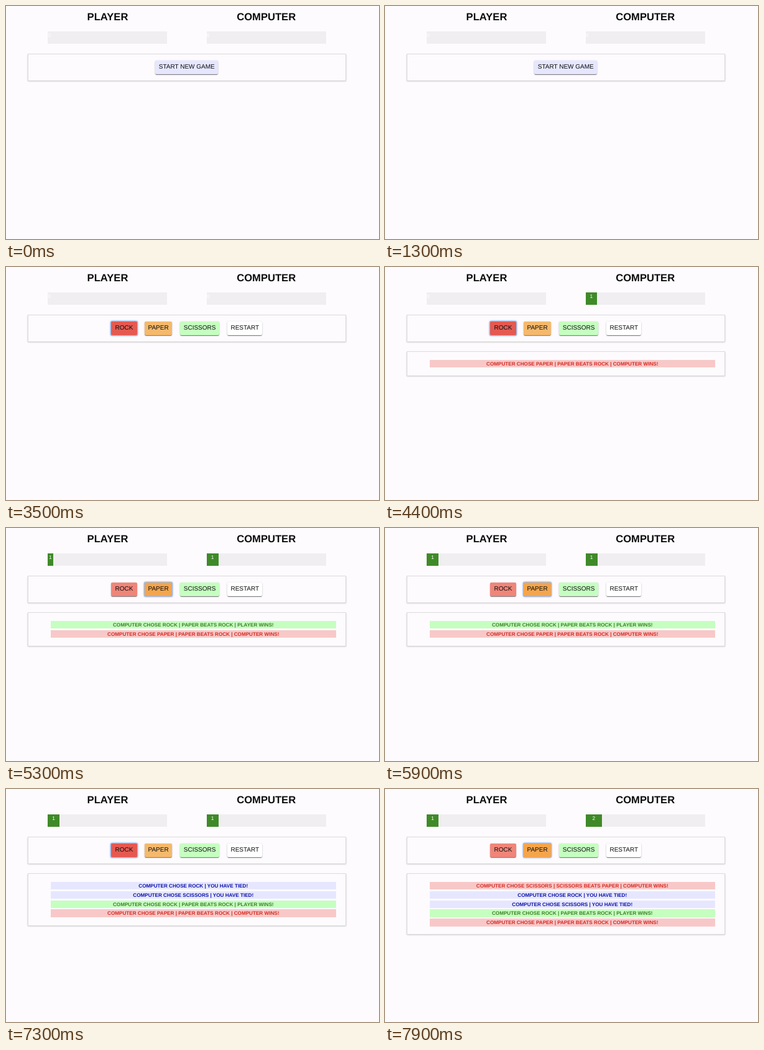
Write an HTML page that moves like this. It is 600 px wide and 376 px high and loops after 8000 ms.

```html
<!DOCTYPE html>
<html lang="en">
<head>
<meta charset="utf-8">
<title>Rock Paper Scissors</title>
<style>
  html, body { margin: 0; width: 100%; height: 100%; overflow: hidden; background: #fdfbfe; }
  * { box-sizing: border-box; }
  .stage {
    position: relative; width: 600px; height: 376px; overflow: hidden;
    font-family: "Liberation Sans", Arial, sans-serif; color: #0c0c0c;
    text-rendering: geometricPrecision;
  }
  .stage > *, .btn { position: absolute; }

  /* everything shares one 8 s clock */
  .a { animation: 8s step-end infinite; }

  h2 { margin: 0; top: 8px; width: 256px; font-size: 16.6px; line-height: 20px; text-align: center; }
  .left { left: 35.5px; }
  .right { left: 290.7px; }

  .bar { top: 41px; width: 192px; height: 20px; background: #f0eef0; }
  .fill { height: 20px; background: #3f8a28; animation: 8s ease infinite; }
  .num { height: 13px; min-width: 5px; overflow: hidden; color: #fff; font-size: 8.3px; line-height: 13px; text-align: center; }
  .num span { display: block; }

  .panel {
    left: 35px; width: 511.5px; background: #fdfbfe; border: .5px solid #dddbde;
    box-shadow: 0 1.3px 1.5px rgba(0,0,0,.18), 0 .6px 3px rgba(0,0,0,.1);
  }
  .btn {
    --rest: 0 1.6px .8px -.8px rgba(0,0,0,.45), 0 1px 1.4px rgba(0,0,0,.22), 0 .5px 2.6px rgba(0,0,0,.15);
    --ring: 0 0 0 1.2px #9dbbea, 0 0 2px 1.6px rgba(130,165,225,.6);
    top: 87.5px; height: 22.5px; border-radius: 2px; background: var(--bg); box-shadow: var(--rest);
    font-size: 10px; line-height: 22.5px; text-align: center; white-space: nowrap;
  }

  .log { top: 136px; padding: 13px 15px 10.5px 36px; animation-name: shown; }
  .row { overflow: hidden; font-size: 8.13px; font-weight: bold; line-height: 13px; text-align: center; white-space: nowrap; }
  .loss { background: #f8c8c8; color: #d42b22; }
  .win { background: #c5ffc0; color: #3c7f24; }
  .tie { background: #e6e7ff; color: #0d14a8; }

  .start { animation-name: start; }
  .choice { animation-name: choice; }
  @keyframes start { 0% { visibility: visible } 28.5%, 100% { visibility: hidden } }
  @keyframes choice { 0% { visibility: hidden } 28.5%, 100% { visibility: visible } }
  @keyframes shown { 0% { visibility: hidden } 44.75%, 100% { visibility: visible } }

  @keyframes rock {
    0%, 62.875%, 95.75%, 100% { background: var(--bg); box-shadow: var(--rest) }
    28.5%, 87.3% { background: var(--hot); box-shadow: var(--ring) }
  }
  @keyframes paper {
    0%, 76.875% { background: var(--bg); box-shadow: var(--rest) }
    62.875%, 95.75%, 100% { background: var(--hot); box-shadow: var(--ring) }
  }
  @keyframes scissors {
    0%, 87.3%, 100% { background: var(--bg); box-shadow: var(--rest) }
    76.875% { background: var(--hot); box-shadow: var(--ring) }
  }

  @keyframes row1 { 0% { height: 0; margin: 0 } 44.75%, 100% { height: 12.4px; margin: 0 0 2.4px } }
  @keyframes row2 { 0% { height: 0; margin: 0 } 62.875%, 100% { height: 12.4px; margin: 0 0 2.4px } }
  @keyframes row3 { 0% { height: 0; margin: 0 } 76.875%, 100% { height: 12.4px; margin: 0 0 2.4px } }
  @keyframes row4 { 0% { height: 0; margin: 0 } 87.3%, 100% { height: 12.4px; margin: 0 0 2.4px } }
  @keyframes row5 { 0% { height: 0; margin: 0 } 95.75%, 100% { height: 12.4px; margin: 0 0 2.4px } }

  /* each point widens a bar by 10% over 1 s; the last growth is cut by the loop */
  @keyframes playerBar { 0%, 62.875% { width: 0 } 75.375%, 100% { width: 10% } }
  @keyframes computerBar {
    0%, 44.75% { width: 0 }
    57.25% { width: 10% }
    95.75% { width: 10%; animation-timing-function: cubic-bezier(.393, .091, .576, .573) }
    100% { width: 15.86% }
  }
  @keyframes playerNum { 0% { transform: none } 62.875%, 100% { transform: translateY(-13px) } }
  @keyframes computerNum {
    0% { transform: none }
    44.75% { transform: translateY(-13px) }
    95.75%, 100% { transform: translateY(-26px) }
  }
</style>
</head>
<body>
<div class="stage">
  <h2 class="left">PLAYER</h2>
  <h2 class="right">COMPUTER</h2>

  <div class="bar" style="left:67px">
    <div class="fill" style="animation-name:playerBar">
      <div class="num"><div class="a" style="animation-name:playerNum"><span>0</span><span>1</span></div></div>
    </div>
  </div>
  <div class="bar" style="left:322.5px">
    <div class="fill" style="animation-name:computerBar">
      <div class="num"><div class="a" style="animation-name:computerNum"><span>0</span><span>1</span><span>2</span></div></div>
    </div>
  </div>

  <div class="panel" style="top:77px;height:43.5px"></div>
  <div class="a start"><div class="btn" style="left:240.2px;width:101.2px;--bg:#e6e7ff">START NEW GAME</div></div>
  <div class="a choice">
    <div class="btn a" style="left:169.2px;width:41.4px;--bg:#f08579;--hot:#e45a51;animation-name:rock">ROCK</div>
    <div class="btn a" style="left:222.9px;width:44.4px;--bg:#f4b96c;--hot:#f5a54c;animation-name:paper">PAPER</div>
    <div class="btn a" style="left:279.9px;width:63.4px;--bg:#c5ffc0;--hot:#c1fdbe;animation-name:scissors">SCISSORS</div>
    <div class="btn" style="left:356.3px;width:56px;--bg:#fff">RESTART</div>
  </div>

  <div class="panel log a">
    <div class="row loss a" style="animation-name:row5">COMPUTER CHOSE SCISSORS | SCISSORS BEATS PAPER | COMPUTER WINS!</div>
    <div class="row tie a" style="animation-name:row4">COMPUTER CHOSE ROCK | YOU HAVE TIED!</div>
    <div class="row tie a" style="animation-name:row3">COMPUTER CHOSE SCISSORS | YOU HAVE TIED!</div>
    <div class="row win a" style="animation-name:row2">COMPUTER CHOSE ROCK | PAPER BEATS ROCK | PLAYER WINS!</div>
    <div class="row loss a" style="animation-name:row1">COMPUTER CHOSE PAPER | PAPER BEATS ROCK | COMPUTER WINS!</div>
  </div>
</div>
</body>
</html>
```
